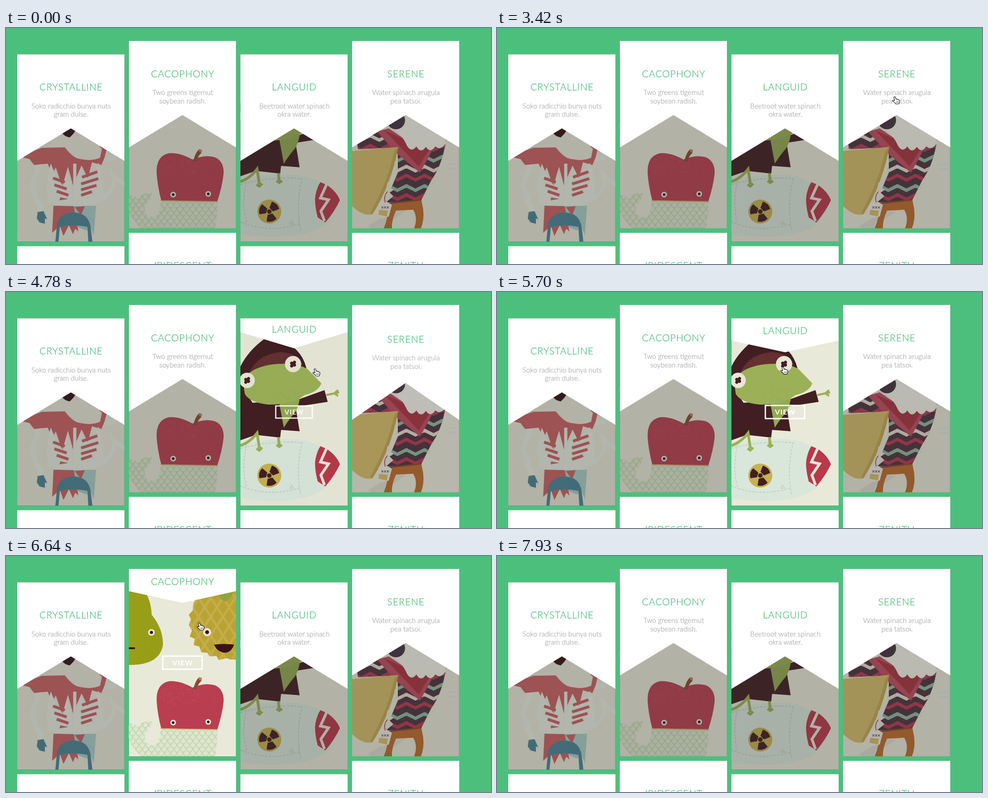
Write an HTML page that moves like this. It is 1072 px wide and 522 px high and loops after 9.6 s.

```html
<!DOCTYPE html>
<html lang="en">
<head>
<meta charset="utf-8">
<title>Shape hover cards</title>
<style>
  html, body { margin: 0; width: 100%; height: 100%; overflow: hidden; background: #4dbf7d; }
  svg { display: block; width: 100%; height: 100%; }
  text { font-family: Lato, "Open Sans", sans-serif; text-anchor: middle; }
  .title { font-size: 21px; font-weight: 300; letter-spacing: 1px; fill: #4dbf7d; stroke: #4dbf7d; stroke-width: .35px; }
  .note { font-size: 15.6px; font-weight: 300; fill: #a6a6a6; stroke: #a6a6a6; stroke-width: .25px; }
  .view text { font-size: 16px; font-weight: 700; letter-spacing: 1px; fill: #fff; }
</style>
</head>
<body>
<svg id="stage" viewBox="0 0 1072 522"></svg>
<script>
const LOOP = 9600, W = 237, H = 414.5;
const stage = document.getElementById('stage');

// Drawing helpers
const shape = (d, fill) => `<path d="${d}" fill="${fill}"/>`;
const line = (d, color, width, extra = '') =>
  `<path d="${d}" fill="none" stroke="${color}" stroke-width="${width}" ${extra}/>`;
const disc = (x, y, r, fill) => `<circle cx="${x}" cy="${y}" r="${r}" fill="${fill}"/>`;
const eye = (x, y, r) => disc(x, y, r, '#efe9d8') + disc(x, y, r * .48, '#3a1419');
const times = (n, fn) => Array.from({ length: n }, (_, i) => fn(i)).join('');
const zigzag = (x, y, dx, dy, n) => `M${x} ${y}` + `l${dx} ${dy}l${dx} ${-dy}`.repeat(n);

function dots(seed, n, x, y, rx, ry, color) {
  const rnd = () => (seed = (seed * 16807) % 2147483647) / 2147483647;
  const d = times(n, () => {
    const a = rnd() * Math.PI * 2, r = Math.sqrt(rnd());
    return `M${(x + rx * r * Math.cos(a)).toFixed(1)} ${(y + ry * r * Math.sin(a)).toFixed(1)}h1`;
  });
  return line(d, color, 1, 'opacity=".6"');
}

function skeleton() {
  const bone = '#e9eee1', red = '#cb6062', teal = '#82b2b0', pale = '#b8d5c9', blue = '#4b8494';
  const dark = '#361219';
  return shape('M25 95H122L116 131Q70 128 25 135Z', pale)
    + shape('M25 134Q70 126 117 130L113 165L52 178Q44 158 25 147Z', teal)
    + shape('M117 95L112 166L165 160L170 95Z', '#c5504f')
    + shape('M170 95L164 160L212 154Q208 130 194 95Z', '#d66b68')
    + shape('M194 95Q208 130 212 154L247 150L250 100Z', pale)
    + shape('M247 108Q230 125 226 152L246 150Z', teal)
    + line('M62 200Q58 236 82 262', '#dfe4d5', 14)
    + line('M56 180L243 157', '#b9353e', 22, 'stroke-linecap="round"')
    + `<g transform="rotate(-7 149 168)">${line(times(24, i =>
        `M${55 + i * 8} 159l4 5l-4 5l4 5l-4 5`), '#d2605f', 3.5)}</g>`
    + shape('M123 217L134 207Q139 205 146 209L157 214Q156 229 141 242Q129 240 124 232Q121 224 123 217Z', dark)
    + shape('M202 213L216 203Q224 206 231 213Q229 225 218 232Q208 231 204 225Q200 219 202 213Z', dark)
    + line('M78 292Q66 320 58 346Q66 380 80 408', bone, 12)
    + line('M205 382Q246 358 236 326Q258 344 268 350', bone, 9)
    + line('M214 286Q246 296 234 268Q226 250 222 240', bone, 11)
    + shape('M27 284L80 265L130 264Q150 290 166 290Q190 295 208 287L212 267L206 262L242 256L231 272L222 270L218 286L211 303L190 297L181 332L167 304L148 347L137 306L124 350L110 308L103 324L92 300L62 303L52 290Z', red)
    + shape('M99 300L121 350L134 318L146 350L147 388L93 387Q86 340 99 300Z', bone)
    + shape('M205 298L180 332L166 312L153 350L158 388L213 380Q222 342 205 298Z', bone)
    + line('M104 332L130 341M107 347L134 356M112 361L138 370M119 378L136 381M202 318L168 330M204 333L166 345M200 348L166 358M190 362L166 370', red, 6.5)
    + shape('M120 302L125 349L137 306ZM137 306L148 347L165 304Z', red)
    + line('M152 300V390', bone, 7)
    + shape('M92 385L145 377L212 380L192 394H108Z', bone)
    + dots(7, 80, 100, 288, 60, 16, '#df8a85')
    + shape('M70 407L83 405L91 423L86 421L86 433L74 430L68 421Z', blue)
    + shape('M105 393L150 394L160 450L153 444L148 456L139 436L127 460L120 440L112 444L102 453Z', red)
    + shape('M150 394L199 393L194 459L187 440L178 448L158 440Z', '#a9cdc6')
    + shape('M152 396L174 394L166 414Z', red)
    + shape('M109 473L113 432Q121 408 150 408Q182 409 187 440L191 473H182L180 440Q150 433 119 440L116 473Z', blue);
}

function fruit() {
  const scales = '<pattern id="scales" width="14" height="18" patternUnits="userSpaceOnUse">'
    + '<rect width="14" height="18" fill="#dfe6cf"/>'
    + line('M0 0Q0 8 7 12Q14 8 14 0M-7 9Q-7 17 0 21Q7 17 7 9M7 9Q7 17 14 21M0 3Q7 0 7 -9M7 -9Q7 0 14 3', '#c4d6b1', 1.8)
    + '</pattern>';
  const body = 'M414 105L420 95L440 78H509V229H496L488 226L470 230L465 221L450 222L445 214L432 213L427 200L415 197L417 183L406 178L411 165L404 152L409 140L404 130L413 120Z';
  return `<defs>${scales}<clipPath id="pine"><path d="${body}"/></clipPath></defs>`
    + shape('M271 70H298Q320 88 322 130Q347 160 347 196Q340 242 271 241Z', '#999e18')
    + dots(31, 90, 318, 200, 24, 34, '#858b12')
    + line('M271 204H285', '#3c1216', 4)
    + eye(321.5, 169, 7.3)
    + shape(body, '#b8a432')
    + `<g clip-path="url(#pine)">${line(times(12, i =>
        `M${330 + i * 27} 70l110 170M${330 + i * 27} 240l110 -170`), '#c7ac4c', 5)}</g>`
    + shape('M464 70Q470 95 484 101Q500 94 506 70Z', '#8fa53c')
    + eye(444.5, 168.5, 9)
    + shape('M460 196Q482 193 504 196Q498 214 482 214Q466 211 460 196Z', '#3c1216')
    + shape('M271 371Q284 367 291 379Q301 362 323 366Q322 380 308 391Q303 414 320 418Q341 421 342 383H467Q468 420 461 443H300Q282 430 271 403Z', 'url(#scales)')
    + shape('M333 322Q331 283 360 277Q384 275 412 291Q440 279 462 286Q482 295 481 322Q478 350 467 384L343 381Q335 350 333 322Z', '#b93f50')
    + dots(11, 150, 385, 307, 45, 24, '#d4747c')
    + dots(19, 100, 448, 337, 25, 42, '#982e42')
    + line('M342 382L468 384', '#d2b070', 2)
    + shape('M414 295Q418 276 427 268L433 270L432 276Q423 285 421 295Z', '#8a4931')
    + shape('M427 268L433 270L432 276L426 273Z', '#c58242')
    + eye(369.5, 368.5, 6.2) + eye(447, 367, 6.2);
}

function frog() {
  const dark = '#411e22', green = '#9bb057', seam = '#b7c9bd', red = '#b9384a';
  const frogEye = (x, y, r) => disc(x, y, r, '#e9e6d6')
    + line(`M${x - 3} ${y + 4}l6 -8M${x - 3} ${y - 2}l6 4`, dark, 7, 'stroke-linecap="round"');
  const blade = 'M588 400.5L601.5 394.5A23 23 0 0 1 601.5 417.5L588 411.5Z';
  return shape('M518 165Q535 130 572 103L590 80L604 105Q652 122 664 168L640 200L518 232Z', dark)
    + shape('M534 190Q548 140 605 133Q640 133 656 160L640 170Z', '#62302f')
    + dots(23, 130, 600, 152, 48, 14, '#8b5148')
    + shape('M518 205L545 245L640 240L704 217L711 243L640 254L649 308L608 305L606 322L552 316L518 328Z', dark)
    + line('M708 228L736 222M726 224L734 217M727 225L734 230', green, 4.5)
    + shape('M603 240L650 232Q646 260 634 272Q624 284 614 300Z', '#93a952')
    + shape('M527 190Q545 166 590 160Q640 155 666 170L697 202Q690 221 660 228Q632 250 580 249Q540 245 528 226Q524 208 527 190Z', green)
    + dots(41, 90, 600, 225, 60, 16, '#7f9544')
    + frogEye(634.5, 159.5, 18) + frogEye(533, 195.5, 17)
    + shape('M518 338Q600 317 664 329Q722 346 738 380Q720 425 698 440Q660 462 590 462Q548 462 518 455Z', '#d9e7da')
    + line('M518 346Q600 326 655 334M655 332Q640 390 651 447M518 429Q580 455 651 433M532 338Q519 390 532 430', seam, 1.5, 'stroke-dasharray="5 3"')
    + line('M627 434L631 427L636 434Z', seam, 1.2)
    + shape('M695 341L709 347Q731 362 738 381Q727 405 706 430L689 419Q681 388 684 370Q688 350 695 341Z', red)
    + line('M709 345L695 376L713 380L696 405L704 427', '#e6e6d8', 6)
    + line('M518 340Q540 332 555 312L560 345M554 346L560 350L566 344M602 321L604 340M598 338L604 342L610 338', green, 6)
    + disc(582, 406, 26.5, '#c8b150')
    + [75, 195, 315].map(a => `<path d="${blade}" fill="${dark}" transform="rotate(${a} 582 406)"/>`).join('')
    + disc(582, 406, 5, dark);
}

function sailor() {
  const dark = '#4c323f', cream = '#e9e6d8', white = '#f4f2e9', red = '#a9333f', wood = '#bb6c2b';
  const knit = 'M776 254Q800 226 834 229L900 256L973 244Q966 300 941 335L916 384L838 386L866 320L866 264L778 268Z';
  const rows = [['#e6dccb', 238], ['#b8384f', 260], ['#8fb89c', 284], ['#e6dccb', 306],
    ['#b8384f', 326], ['#8fb89c', 349], ['#b8384f', 369]];
  return `<defs><clipPath id="knit"><path d="${knit}"/></clipPath></defs>`
    + shape('M800 150Q810 80 885 70Q965 80 982 160Q984 215 970 250L838 226Q806 205 800 150Z', cream)
    + shape('M802 132Q812 72 885 62Q958 72 978 132Q890 108 802 132Z', red)
    + shape(knit, dark)
    + `<g clip-path="url(#knit)">${rows.map(([c, y]) => line(zigzag(765, y, 20, 10, 6), c, 7)).join('')}</g>`
    + dots(53, 170, 905, 320, 44, 58, '#8d7880')
    + shape('M820 229L846 222L905 262L947 262L915 320L862 276Z', '#c04a60')
    + shape('M836 226L880 246L940 262L912 306L880 272Z', red)
    + shape('M838 214Q874 230 886 260q10 17 21 2q10 17 21 1q10 15 21 -1q12 10 23 -7V195H842Z', white)
    + disc(862, 204, 20, '#42333c') + disc(930, 178, 20, '#42333c')
    + dots(61, 60, 862, 204, 17, 17, '#8d7880')
    + line('M972 306Q986 298 1002 302M978 312L1002 310', '#dfe3d7', 2)
    + shape('M765 272L867 263Q852 345 810 412Q790 418 765 394Z', '#d5bd68')
    + dots(71, 110, 805, 335, 45, 60, '#bda24c')
    + shape('M858 273L867 263Q852 345 810 412L805 409Q844 340 858 273Z', '#c5a54f')
    + shape('M843 341L852 346L848 352L857 358L848 364L856 372L842 384L836 380Z', cream)
    + shape('M800 438L850 408L886 403L855 425L832 443H806Z', '#dedccd')
    + shape('M846 388L918 380L922 400Q925 425 917 443H902Q911 420 900 402L862 404Q852 425 853 443H835Q845 420 846 388Z', wood)
    + line('M846 388L918 380', '#8f4528', 3)
    + shape('M826 387L838 382L853 391L846 417L833 420L820 414Z', '#efece0')
    + shape('M825 402L844 404L842 417L823 413Z', '#d9bf65')
    + line('M830 395l4 4m0 -4l-4 4M836 395l4 4m0 -4l-4 4M842 395l4 4m0 -4l-4 4', dark, 1.2)
    + line('M838 386Q834 372 843 362', red, 1.5);
}

// hover: time the pointer enters and leaves
const cards = [
  { title: 'CRYSTALLINE', note: ['Soko radicchio bunya nuts', 'gram dulse.'], art: skeleton, hover: [7020, 7570] },
  { title: 'CACOPHONY', note: ['Two greens tigernut', 'soybean radish.'], art: fruit, hover: [5856, 7020], next: 'IRIDESCENT' },
  { title: 'LANGUID', note: ['Beetroot water spinach', 'okra water.'], art: frog, hover: [4590, 5856] },
  { title: 'SERENE', note: ['Water spinach arugula', 'pea tatsoi.'], art: sailor, hover: [3440, 4590], next: 'ZENITH' }
];

const label = (cls, x, y, s) => `<text class="${cls}" x="${x}" y="${y}">${s}</text>`;

function cardMarkup(card, i) {
  const x = 24.8 + 246.67 * i, y = i % 2 ? 28.6 : 58.2, mid = x + W / 2 + .7;
  const below = y + H + 10;
  return `<clipPath id="card${i}"><rect x="${x}" y="${y}" width="${W}" height="${H}"/></clipPath>
    <g clip-path="url(#card${i})">
      <rect x="${x}" y="${y}" width="${W}" height="${H}" fill="#333"/>
      <g class="art"><rect x="${x}" y="${y}" width="${W}" height="${H}" fill="#e9e9d9"/>${card.art()}</g>
      <path class="flap" fill="#fff" transform="translate(${x} ${y}) scale(${W / 180} ${H / 320})"/>
      <g class="caption">${label('title', mid, y + 80.2, card.title)}
        <g class="text">${card.note.map((s, n) => label('note', mid, y + 119.4 + 18.8 * n, s)).join('')}</g>
      </g>
      <g transform="translate(${x + W / 2} ${y + H / 2})"><g class="view">
        <rect x="-43.5" y="-14.5" width="87" height="29" fill="none" stroke="#fff" stroke-width="3"/>
        ${label('view-label', .5, 5.8, 'VIEW')}
      </g></g>
    </g>
    <rect x="${x}" y="${below}" width="${W}" height="${H}" fill="#fff"/>
    ${card.next ? label('title', mid, below + 80.2, card.next) : ''}`;
}

const arrowArt = '<path d="M0 0V14.5L3.4 11.4L5.8 17L8.2 16L5.8 10.6H10.4Z" fill="#111" stroke="#fff"/>';
const handArt = '<path d="M3 2.2Q4.8 -.4 6.5 2L8.2 6.6Q10 5.4 11.2 7.2Q13.2 6.3 14 8.3Q16 8 16 10.2L15.4 14L14 17H7.2L5.6 14.6L.2 10.2Q.8 7.8 5 9.6Z" fill="#fff" stroke="#111" stroke-width="1.2" stroke-linejoin="round"/>'
  + line('M8.7 11.5v3M10.8 11.3v3M12.8 11v3', '#111', .8);

stage.innerHTML = '<rect width="1072" height="522" fill="#4dbf7d"/>' + cards.map(cardMarkup).join('')
  + `<g id="arrow">${arrowArt}</g><g id="hand">${handArt}</g>`;

const parts = name => [...stage.querySelectorAll('.' + name)];
const [arts, flaps, captions, texts, views] = ['art', 'flap', 'caption', 'text', 'view'].map(parts);
const arrow = document.getElementById('arrow'), hand = document.getElementById('hand');

// Easing
function bezier(x1, y1, x2, y2) {
  const at = (a, b, s) => 3 * (1 - s) ** 2 * s * a + 3 * (1 - s) * s * s * b + s ** 3;
  return x => {
    let lo = 0, hi = 1;
    for (let i = 0; i < 24; i++) {
      const m = (lo + hi) / 2;
      if (at(x1, x2, m) < x) lo = m; else hi = m;
    }
    return at(y1, y2, lo);
  };
}
const ease = bezier(.25, .1, .25, 1);
const easeOutBack = bezier(.175, .885, .32, 1.275);
const backOut = x => (x - 1) ** 2 * (2.70158 * (x - 1) + 1.70158) + 1;
const clamp = x => Math.max(0, Math.min(1, x));
const amount = (t, [enter, leave], fn, inTime, outTime = inTime) =>
  fn(clamp((t - enter) / inTime)) - fn(clamp((t - leave) / outTime));

const bursts = [[750, 1280, 9], [1580, 2160, 11], [3420, 3470, 2], [3620, 3830, 3], [4190, 4630, 7],
  [4780, 4950, 3], [5610, 5960, 6], [5960, 6230, 4], [6640, 7440, 11], [7440, 7560, 3], [7610, 7930, 5]];

function snap(t) {
  const burst = bursts.filter(b => b[0] <= t).pop();
  if (!burst) return 0;
  const [first, last, n] = burst, step = (last - first) / (n - 1);
  return first + step * Math.min(n - 1, Math.floor((t - first) / step + 1e-6));
}

// Pointer path: [time, x, y]
const track = [[750, 1023, 508], [1280, 907, 316], [1580, 907, 316], [2160, 880, 154], [3419, 880, 154],
  [3420, 874, 151], [4190, 874, 151], [4590, 750, 163], [4780, 678, 169], [5610, 678, 169],
  [5960, 422, 147], [6640, 422, 147], [7440, 82, 169], [9600, 82, 169]];

function pointer(t) {
  const i = Math.max(1, track.findIndex(k => k[0] >= t));
  const [t0, x0, y0] = track[i - 1], [t1, x1, y1] = track[i];
  const u = clamp((t - t0) / (t1 - t0));
  return `translate(${x0 + (x1 - x0) * u} ${y0 + (y1 - y0) * u})`;
}

function draw(time) {
  const t = snap(time);
  cards.forEach(({ hover }, i) => {
    const fade = amount(t, hover, ease, 300);
    const morph = amount(t, hover, backOut, 330);
    const edge = 182 - 144 * morph, tip = 126.5 - 68.5 * morph;
    arts[i].setAttribute('opacity', .7 + .3 * fade);
    flaps[i].setAttribute('d', `M0 0V${edge}L90 ${tip}L180 ${edge}V0Z`);
    captions[i].setAttribute('transform', `translate(0 ${-45 * amount(t, hover, easeOutBack, 360)})`);
    texts[i].setAttribute('opacity', 1 - amount(t, hover, ease, 100, 300));
    views[i].setAttribute('transform', `scale(${.25 + .75 * fade})`);
    views[i].setAttribute('opacity', fade);
  });
  const place = pointer(t);
  arrow.setAttribute('transform', place);
  hand.setAttribute('transform', place);
  arrow.setAttribute('visibility', t >= 750 && t < 3420 ? 'visible' : 'hidden');
  hand.setAttribute('visibility', t >= 3420 && t < 7600 ? 'visible' : 'hidden');
}

const start = performance.now();
function tick() {
  draw((performance.now() - start) % LOOP);
  requestAnimationFrame(tick);
}
tick();
</script>
</body>
</html>
```
